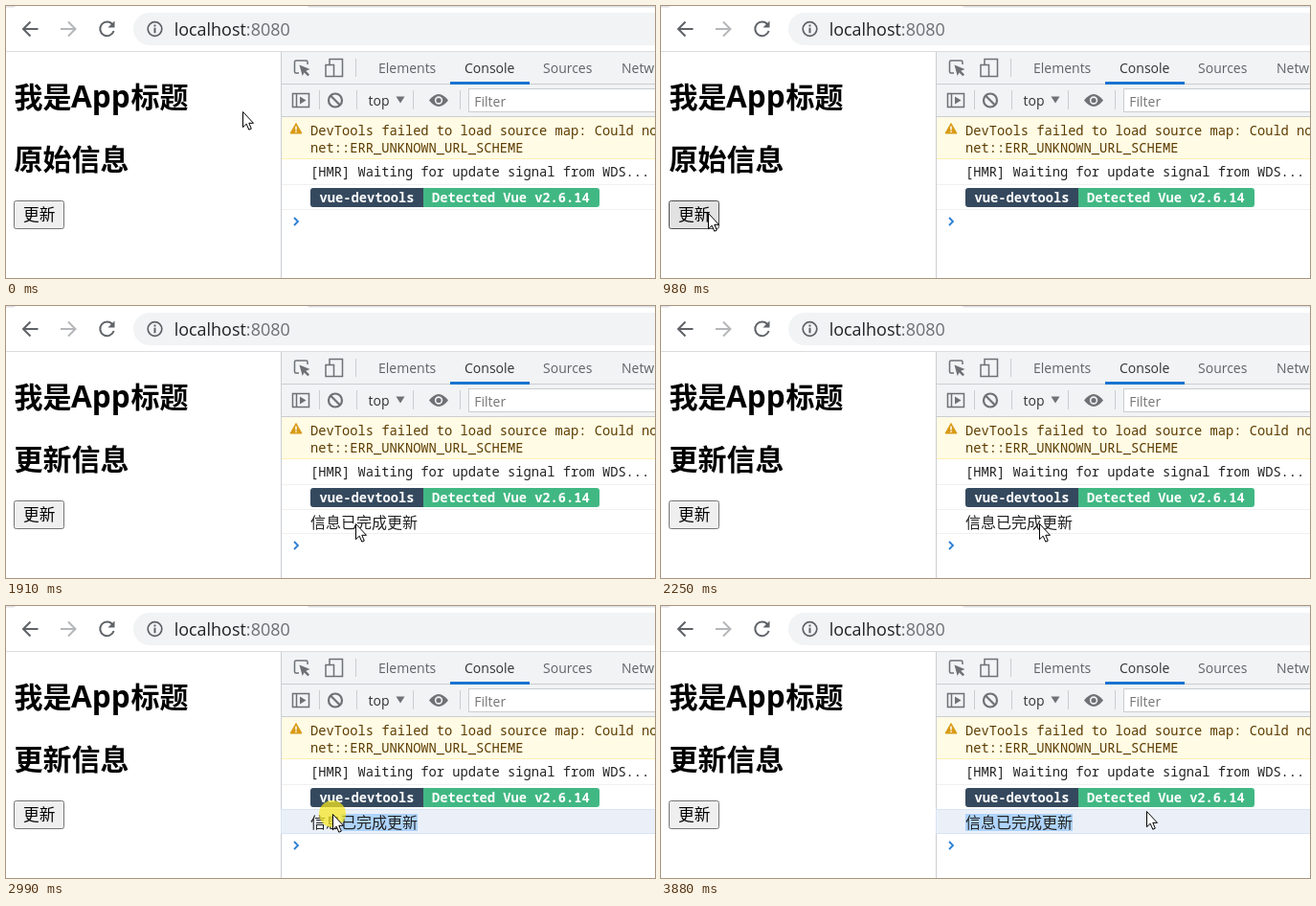
Write an HTML page that moves like this. It is 678x284 px and loops after 4410 ms.

```html
<!DOCTYPE html>
<html lang="zh-CN">
<head>
<meta charset="utf-8">
<style>
  html, body { margin: 0; width: 100%; height: 100%; overflow: hidden; background: #fff; }
  svg { display: block; width: 678px; height: 284px; }
  text { white-space: pre; }
  .ui { font: 14px "Open Sans", "Noto Sans", sans-serif; fill: #5f6368; }
  .url { font: 17.95px "Open Sans", "Noto Sans", sans-serif; fill: #202124; }
  .head { font: bold 30px "Noto Sans CJK SC", "Noto Sans CJK", sans-serif; }
  .latin { font: bold 31.5px "Open Sans", "Noto Sans", sans-serif; }
  .cjk { font: 16px "Noto Sans CJK SC", "Noto Sans CJK", sans-serif; }
  .mono { font: 13.74px "Noto Sans Mono", "DejaVu Sans Mono", monospace; fill: #222; }
  .warn { fill: #5c3c00; }
  .badge { font-weight: bold; fill: #fff; }
  .icon { fill: none; stroke: #6e7175; stroke-width: 1.5; }
  .bold { stroke-width: 2.2; }
  .solid { fill: #6e7175; }
  .nav { fill: none; stroke: #5f6368; stroke-width: 2; }
  .sep { stroke: #cbcdd1; }
  .rule { stroke: #f0f0f0; }
  .dark { fill: #333; }
</style>
</head>
<body>
<svg viewBox="0 0 678 284">
  <rect width="678" height="284" fill="#fff"/>

  <!-- browser toolbar -->
  <path d="M0 0H10L8 1.5H0ZM314 0H678V1.5H317Z" fill="#dee1e6"/>
  <path d="M150 7H678V41H150A17 17 0 0 1 150 7Z" fill="#f1f3f4"/>
  <path class="nav" d="M33.5 24H18.5M25.5 16.5L18 24L25.5 31.5"/>
  <path class="nav" d="M57 24H72M65 16.5L72.5 24L65 31.5" style="stroke:#b4b6b9"/>
  <path class="nav" d="M111.3 19.3A7.3 7.3 0 1 0 112.6 26"/>
  <path d="M113.5 15.5V22.5H106.5Z" fill="#5f6368"/>
  <circle class="nav" cx="155.5" cy="24" r="7.3" style="stroke-width:1.7"/>
  <path class="nav" d="M155.5 22.8V28.2M155.5 19.6V21.4"/>
  <text class="url" x="175.7" y="31">localhost<tspan fill="#6b6f74">:8080</tspan></text>
  <path d="M0 47.5H678" stroke="#dadce0"/>

  <!-- page -->
  <text class="head" x="8.4" y="106">我是</text>
  <text class="latin" x="68" y="105.5">App</text>
  <text class="head" x="130.6" y="106">标题</text>
  <text class="head" id="info" x="8.4" y="171">原始信息</text>
  <rect id="button" x="8.5" y="203.5" width="52" height="29" rx="2" fill="#efefef" stroke="#767676"/>
  <text class="cjk" x="18" y="224" style="font-size:16.67px">更新</text>

  <!-- devtools header -->
  <rect x="288" y="48" width="390" height="67" fill="#f1f3f4"/>
  <path class="sep" d="M287.5 48V284M288 81.5H678M288 115.5H678M365.5 55V74M327.5 88V108M366.5 88V108M425.5 88V108M474.5 88V108"/>
  <path class="icon" d="M306 70H303Q301.5 70 301.5 68.5V58.5Q301.5 57 303 57H313.5Q315 57 315 58.5V61"/>
  <path class="solid" d="M306.5 61.5L317.5 66L313.3 67.7L317 71.5L315.3 73.2L311.5 69.4L309.7 73Z"/>
  <path class="icon" d="M338 61V55.5H351.5V73.5H343M334 61.5H342.5V73.5H334Z"/>
  <text class="ui" x="389" y="70">Elements</text>
  <text class="ui dark" x="479" y="70">Console</text>
  <text class="ui" x="561" y="70">Sources</text>
  <text class="ui" x="643" y="70">Network</text>
  <rect x="464" y="79" width="83" height="3" fill="#1a73d0"/>

  <path class="icon" d="M299.5 91.5H316.5V105.5H299.5ZM303.5 91.5V105.5"/>
  <path class="solid" d="M307 94.5L313.5 98.5L307 102.5Z"/>
  <circle class="icon bold" cx="344" cy="98.5" r="7"/>
  <path class="icon bold" d="M339 93.5L349 103.5"/>
  <text class="ui dark" x="378.5" y="103.5">top</text>
  <path class="solid" d="M407.5 94.5H416.5L412 101.5Z"/>
  <path class="solid" d="M442 98.5Q452 85.5 462 98.5Q452 111.5 442 98.5Z"/>
  <circle class="solid" cx="452" cy="98.5" r="3.4" stroke="#f1f3f4" stroke-width="1.6"/>
  <rect class="sep" x="483.5" y="86.5" width="210" height="24" fill="#fff"/>
  <text class="ui" x="489.3" y="104.5" style="fill:#757575">Filter</text>

  <!-- console -->
  <rect x="288" y="116" width="390" height="43" fill="#fffbe5"/>
  <path d="M288 159.5H678" stroke="#fff0b3"/>
  <path d="M303 122.5L309 133H297Z" fill="#d99a16" stroke="#d99a16" stroke-linejoin="round"/>
  <path d="M303 125.5V129.5M303 130.5V132" stroke="#fff" stroke-width="1.5"/>
  <text class="mono warn" x="318" y="135">DevTools failed to load source map: Could not</text>
  <text class="mono warn" x="318" y="153">net::ERR_UNKNOWN_URL_SCHEME</text>
  <text class="mono" x="318" y="178">[HMR] Waiting for update signal from WDS...</text>
  <path class="rule" d="M288 186.5H678M288 212.5H678"/>
  <path d="M321 190H436V210H321Q318 210 318 207V193Q318 190 321 190Z" fill="#35495e"/>
  <path d="M436 190H617Q620 190 620 193V207Q620 210 617 210H436Z" fill="#41b883"/>
  <text class="mono badge" x="327.5" y="205">vue-devtools</text>
  <text class="mono badge" x="445" y="205">Detected Vue v2.6.14</text>
  <g id="log">
    <path class="rule" d="M288 237.5H678"/>
    <rect id="row" x="287.5" y="212.5" width="392" height="25" fill="#ebf0f8" stroke="#d8e3f5"/>
    <rect id="selection" y="217" height="18" fill="#aed3fb"/>
    <text class="cjk" x="318" y="231.7" fill="#222" font-weight="300" style="font-weight:300">信息已完成更新</text>
  </g>
  <path id="prompt" d="M301 221L305 225L301 229" fill="none" stroke="#2a7fd4" stroke-width="1.8"/>

  <g id="pointer">
    <circle id="halo" r="14" fill="#f5e61e" opacity=".72"/>
    <path d="M.5 .5V16.7L4.2 13.2L6.8 19.2L9.3 18.1L6.8 12.3H11.5Z" fill="#fff" stroke="#000"/>
  </g>
</svg>
<script>
const LOOP = 4410;
const CHAR = 16, TEXT_X = 318, TEXT_LEN = 7;
const $ = id => document.getElementById(id);

const smooth = k => k * k * (3 - 2 * k);
const speedUp = k => k ** 1.55;
const slowDown = k => 1 - (1 - k) ** 2.3;

// Each stroke carries the pointer on from where the last one ended
const home = { x: 247, y: 110 };
const strokes = [
  { from: 70, to: 590, steps: 9, x: 49, y: 216, ease: smooth },
  { from: 1180, to: 1650, steps: 8, x: 284, y: 218, ease: speedUp },
  { from: 1710, to: 2180, steps: 8, x: 386, y: 229, ease: slowDown },
  { from: 2250, to: 2720, steps: 8, x: 421, y: 222, ease: slowDown },
  { from: 2790, to: 3280, steps: 8, x: 320, y: 216, ease: slowDown },
  { from: 3540, to: 3880, steps: 6, x: 507, y: 214, ease: smooth }
];
const drag = strokes[4];

const within = (t, a, b) => t >= a && t < b;
const show = (id, on) => $(id).setAttribute("visibility", on ? "inherit" : "hidden");

function pointerAt(t) {
  let { x, y } = home;
  for (const s of strokes) {
    if (t < s.from) break;
    const gap = (s.to - s.from) / (s.steps - 1);
    const step = Math.floor((t - s.from) / gap + 0.25) + 1;
    const k = s.ease(Math.min(1, step / s.steps));
    x += (s.x - x) * k;
    y += (s.y - y) * k;
  }
  return [Math.round(x), Math.round(y)];
}

function render(t) {
  const [x, y] = pointerAt(t);
  const clicking = within(t, 650, 910);
  const updated = t >= 1840;
  const over = within(x, 8, 61) && within(y, 203, 233);

  $("pointer").setAttribute("transform", `translate(${x} ${y})`);
  show("halo", clicking || within(t, 2580, 3540));
  $("button").setAttribute("fill", clicking ? "#f5f5f5" : over ? "#e2e2e2" : "#efefef");
  $("button").setAttribute("stroke", over ? "#4f4f4f" : "#767676");

  $("info").textContent = updated ? "更新信息" : "原始信息";
  show("log", updated);
  show("row", t >= 2310);
  $("prompt").setAttribute("transform", `translate(0 ${updated ? 25 : 0})`);

  // Dragging selects whole characters from the end of the line
  const dragX = pointerAt(Math.min(t, drag.to))[0];
  const first = t < drag.from ? TEXT_LEN
    : Math.min(TEXT_LEN, Math.max(0, Math.round((dragX + 4 - TEXT_X) / CHAR)));
  $("selection").setAttribute("x", TEXT_X + first * CHAR);
  $("selection").setAttribute("width", (TEXT_LEN - first) * CHAR);
}

function tick() {
  render(performance.now() % LOOP);
  requestAnimationFrame(tick);
}
tick();
</script>
</body>
</html>
```
